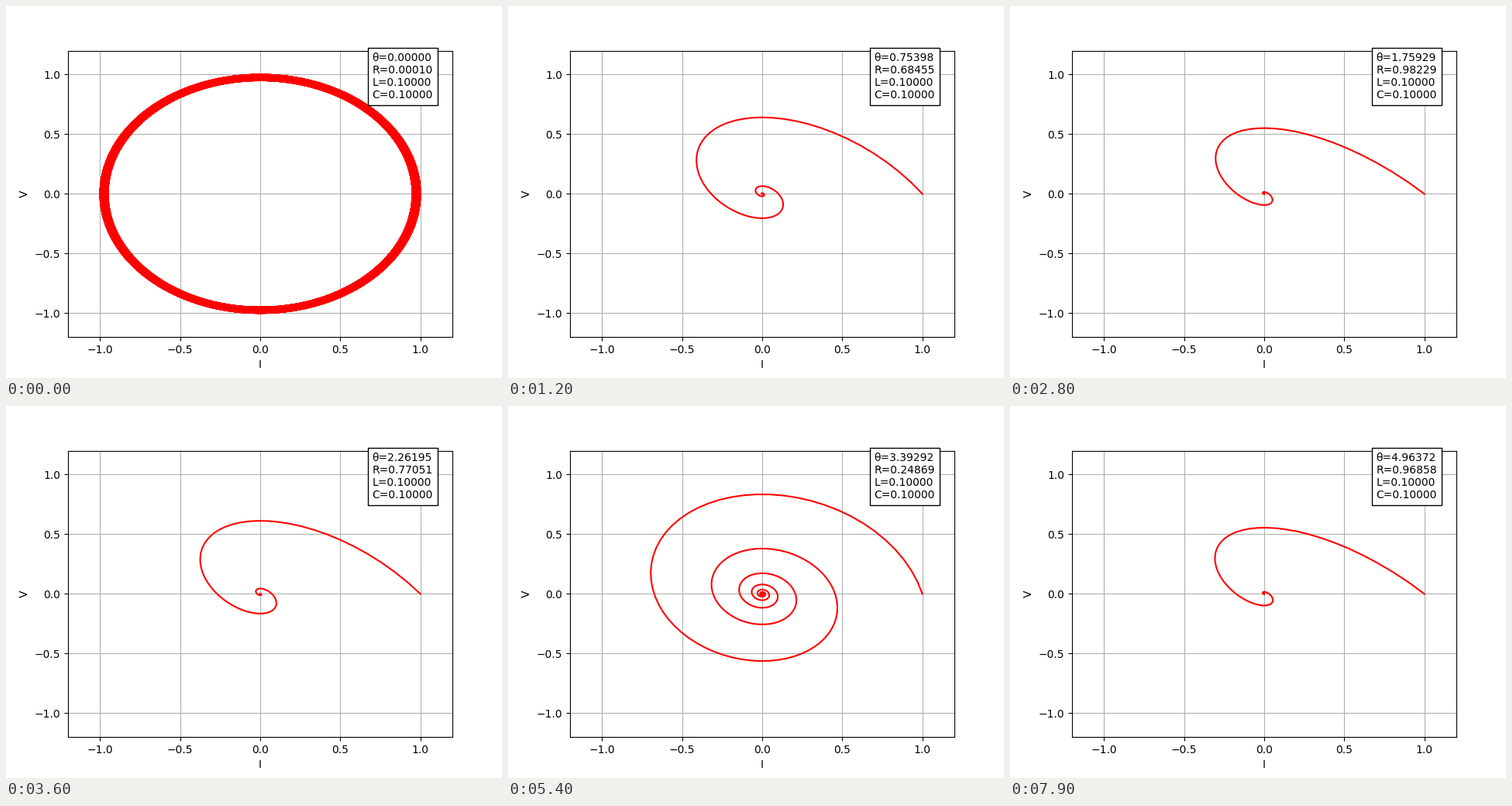
A matplotlib script that plays this animation: 640x480 px, repeating every 8 s.

```python
import numpy as np
import matplotlib.pyplot as plt
from matplotlib.animation import FuncAnimation

FRAMES = 80
INTERVAL = 100
L = C = 0.1
R_MIN = 1e-4
t = np.arange(0, 100, 0.01)


def trajectory(r):
    """Current and voltage of a series RLC circuit with I(0)=1, V(0)=0."""
    a = r / (2 * L)
    w = np.sqrt(1 / (L * C) - a * a)
    decay = np.exp(-a * t)
    s, c = np.sin(w * t), np.cos(w * t)
    return decay * (c - a / w * s), decay * s / (C * w)


fig, ax = plt.subplots(figsize=(6.4, 4.8), dpi=100)
ax.set(xlim=(-1.2, 1.2), ylim=(-1.2, 1.2), xlabel="I", ylabel="V")
ax.grid(True)
line, = ax.plot([], [], color="red")
label = ax.text(0.7, 0.8, "", bbox=dict(facecolor="white", edgecolor="black"))


def update(i):
    theta = 2 * np.pi * i / 100
    r = max(abs(np.sin(theta)), R_MIN)
    line.set_data(*trajectory(r))
    label.set_text(f"θ={theta:.5f}\nR={r:.5f}\nL={L:.5f}\nC={C:.5f}")
    return line, label


anim = FuncAnimation(fig, update, frames=FRAMES, interval=INTERVAL,
                     init_func=lambda: update(0), repeat=True, repeat_delay=0)
plt.show()
```
